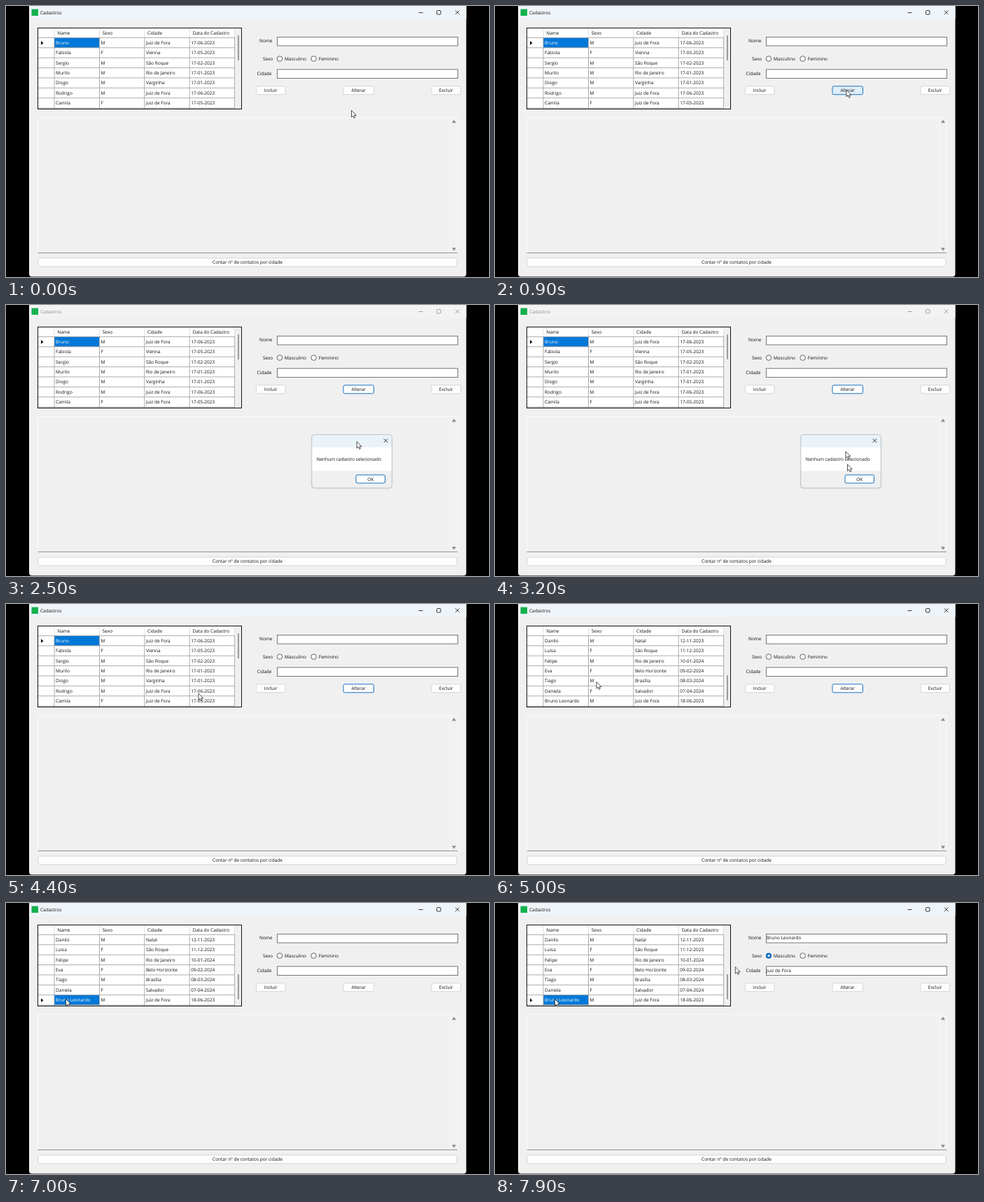
An HTML page that plays this animation: 690x388 px, repeating every 8000 ms.

```html
<!DOCTYPE html>
<html lang="pt">
<head>
<meta charset="utf-8">
<style>
html, body { margin: 0; width: 100%; height: 100%; overflow: hidden; background: #000; }
svg { display: block; width: 690px; height: 388px; }
text { font: 6.5px "Open Sans", "Noto Sans", sans-serif; fill: #111; text-rendering: geometricPrecision; white-space: pre; }
.mid { text-anchor: middle; }
.line { fill: none; stroke: #222; stroke-width: .9; }
.button { fill: #fdfdfd; stroke: #d2d2d2; stroke-width: .9; }
.focus { stroke: #0067c0; }
.hover { fill: #dfeef9; stroke: #0067c0; }
.field { fill: #fff; stroke: #777; }
.radio { fill: #f8f8f8; stroke: #555; stroke-width: .9; }
.on { fill: #fff; stroke: #0067c0; stroke-width: 2.4; }
.inactive text { fill: #8d8d8d; }
.inactive .line { stroke: #999; }
.inactive .bar { fill: #f3f3f3; }
.cursor { fill: #fff; stroke: #222; stroke-width: .8; stroke-linejoin: round; }
</style>
</head>
<body>
<svg id="stage" viewBox="0 0 690 388"></svg>
<script>
const rect = (x, y, w, h, attrs = '') => `<rect x="${x}" y="${y}" width="${w}" height="${h}" ${attrs}/>`;
const text = (x, y, s, attrs = '') => `<text x="${x}" y="${y}" ${attrs}>${s}</text>`;
const path = (d, attrs = 'class="line"') => `<path d="${d}" ${attrs}/>`;
const button = (id, x, y, w, h, label) =>
  rect(x, y, w, h, `id="${id}" rx="2" class="button"`) + text(x + w / 2, y + h / 2 + 2.4, label, 'class="mid"');
const cross = (x, y) => path(`M${x} ${y}l5.6 5.6m0-5.6l-5.6 5.6`);

const people = `Bruno,M,Juiz de Fora,17-06-2023
Fabiola,F,Vienna,17-05-2023
Sergio,M,São Roque,17-02-2023
Murilo,M,Rio de Janeiro,17-01-2023
Diogo,M,Varginha,17-01-2023
Rodrigo,M,Juiz de Fora,17-06-2023
Camila,F,Juiz de Fora,17-05-2023
Danilo,M,Natal,12-11-2023
Luisa,F,São Roque,11-12-2023
Felipe,M,Rio de Janeiro,10-01-2024
Eva,F,Belo Horizonte,09-02-2024
Tiago,M,Brasília,08-03-2024
Daniela,F,Salvador,07-04-2024
Bruno Leonardo,M,Juiz de Fora,18-06-2023`.split('\n').map(row => row.split(','));
const columns = [69, 133.5, 197.8, 262.2];
const top0 = 45.4, rowH = 14.38;

const titleBar = `<g id="title">
  ${rect(33, 0, 624.5, 18.5, 'fill="#eff4f9" class="bar"')}
  ${rect(36.5, 4.5, 9.5, 9.5, 'fill="#15b04e"')}
  ${text(49, 12, 'Cadastros')}
  ${path('M589.5 9.5h6')}${rect(615.5, 6.5, 5.5, 5.5, 'rx="1" class="line"')}${cross(642, 6.4)}
</g>`;

const grid = rect(45.5, 31.5, 291, 116, 'fill="#f0f0f0"') + rect(46, 32, 281, 115.5, 'fill="#fff"') +
  '<g id="rows"></g>' +
  path([...columns, 326.6].map(x => `M${x} 45V147.5`).join(''), 'stroke="#a3a3a3" stroke-width=".9"') +
  path([...columns, 326.6].map(x => `M${x} 32V45`).join(''), 'stroke="#ddd" stroke-width=".9"') +
  path([...Array(8).keys()].map(i => `M46 ${top0 + i * rowH}H327`).join(''), 'stroke="#a3a3a3" stroke-width=".9"') +
  ['Name', 'Sexo', 'Cidade', 'Data do Cadastro'].map((s, i) => text(columns[i] + 4.3, 41.2, s)).join('') +
  rect(331.3, 42, 1.4, 36, 'id="thumb" rx=".7" fill="#777"') +
  rect(45.5, 31.5, 291, 116, 'fill="none" stroke="#111"');

const form = text(362, 52.2, 'Nome') + rect(387.5, 44.5, 258, 12.5, 'class="field"') +
  text(367, 78, 'Sexo') + '<circle id="male" cx="391" cy="75.5" r="3.8" class="radio"/>' + text(398, 78, 'Masculino') +
  '<circle cx="439.6" cy="75.5" r="3.8" class="radio"/>' + text(446.8, 78, 'Feminino') +
  text(358.5, 98.8, 'Cidade') + rect(387.5, 90.8, 258, 12.7, 'class="field"') +
  `<g id="filled">${text(388, 52, people[13][0])}${text(388, 98.8, people[13][2])}</g>` +
  button('add', 357.5, 114.8, 41.5, 12, 'Incluir') +
  button('edit', 482, 114.8, 43.5, 12, 'Alterar') +
  button('del', 608, 114.8, 41.5, 12, 'Excluir');

const report = path('M45.5 353V159.7H645V353', 'fill="none" stroke="#fafafa"') +
  path('M635 160V353', 'stroke="#f8f8f8"') + path('M45.5 353.4H645', 'stroke="#909090"') +
  path('M637 167.3l3-4.3 3 4.3zM637 346.2l3 4.3 3-4.3z', 'fill="#8a8a8a"') +
  button('count', 46, 361, 598, 12, 'Contar nº de contatos por cidade');

const dialog = `<g id="dialog">
  ${rect(435.5, 185.5, 117, 78, 'rx="5" fill="#000" opacity=".06"')}
  ${rect(436.8, 185.6, 114.5, 76.4, 'rx="4" fill="#f0f0f0"')}
  ${path('M436.8 203.5V189.6q0-4 4-4h106.5q4 0 4 4v13.9z', 'fill="#eaf3f8"')}
  ${rect(436.8, 203.5, 114.5, 34, 'fill="#fff"')}
  ${rect(436.8, 185.6, 114.5, 76.4, 'rx="4" fill="none" stroke="#b0bcc3" stroke-width=".8"')}
  ${cross(539.7, 191.4)}
  ${text(443.5, 222.8, 'Nenhum cadastro selecionado')}
  ${button('ok', 500, 243.2, 41.5, 11.8, 'OK')}
</g>`;

const arrow = 'M0 0V9.6L2.2 7.6L3.7 10.8L5.3 10.1L3.9 7H6.8Z';

const stage = document.getElementById('stage');
stage.innerHTML = path('M33 0H657.5V383.5q0 4-4 4H37q-4 0-4-4z', 'fill="#f0f0f0"') +
  titleBar + grid + form + report + dialog + '<g id="trails"></g>' + path(arrow, 'id="cursor" class="cursor"');
const $ = id => document.getElementById(id);

// time, x, y of the pointer tip
const route = [
  [0, 493.5, 149.5], [100, 493.5, 149.5], [500, 502, 120.3], [2200, 502, 120.3],
  [2600, 501, 209.5], [3000, 501, 209.5], [3200, 503.5, 228], [3600, 517, 245],
  [4100, 517, 245], [4400, 275, 128], [4700, 145, 111.5], [5200, 145, 111.5],
  [5600, 113, 133.8], [5900, 97, 136.5], [6300, 97, 136.5], [6700, 85.5, 137.5],
  [7200, 85.5, 137.5], [7700, 343.3, 91.5], [8000, 343.3, 91.5]
];
// pointer images left behind: from, to, x, y
const trails = [
  [3100, 3400, 501, 209.5], [5200, 6300, 145, 111.5],
  [5700, 6400, 113, 133.8], [7200, 8000, 85.5, 137.5]
];

function pointerAt(t) {
  const i = route.findIndex(p => p[0] > t);
  const [a, ax, ay] = route[i - 1], [b, bx, by] = route[i];
  const u = (t - a) / (b - a), k = u * u * (3 - 2 * u);
  return [ax + (bx - ax) * k, ay + (by - ay) * k];
}

function drawRows(first, selected) {
  let out = '';
  for (let i = 0; i < 7; i++) {
    const y = top0 + i * rowH, active = first + i === selected;
    if (active) out += rect(69, y, 64.5, rowH, 'fill="#0078d7"') +
      path(`M50 ${y + 4.7}l3.5 2.8-3.5 2.8z`, 'fill="#111"');
    people[first + i].forEach((s, c) => {
      out += text(columns[c] + 2.1, y + 9.5, s, active && !c ? 'style="fill:#fff"' : '');
    });
  }
  $('rows').innerHTML = out;
}

function render(t) {
  const modal = t >= 2200 && t < 4100;
  const first = t < 4600 ? 0 : t < 4700 ? 3 : t < 4800 ? 6 : 7;
  const filled = t >= 7300;
  drawRows(first, t < 5900 ? 0 : 13);
  $('thumb').setAttribute('y', 42 + first * 60 / 7);
  $('title').setAttribute('class', modal ? 'inactive' : '');
  $('dialog').style.display = modal ? '' : 'none';
  $('edit').setAttribute('class', 'button ' + (t < 400 || t >= 5900 ? '' : t < 2200 ? 'hover' : 'focus'));
  $('ok').setAttribute('class', 'button ' + (t < 3700 ? 'focus' : 'hover'));
  $('filled').style.display = filled ? '' : 'none';
  $('male').setAttribute('class', filled ? 'on' : 'radio');
  $('male').setAttribute('r', filled ? 2.9 : 3.8);
  $('trails').innerHTML = trails.filter(([a, b]) => t >= a && t < b)
    .map(([, , x, y]) => path(arrow, `class="cursor" transform="translate(${x} ${y})"`)).join('');
  $('cursor').setAttribute('transform', `translate(${pointerAt(t)})`);
}

const start = performance.now();
let shown = -1;
function tick(now) {
  const t = Math.floor(Math.max(0, now - start) % 8000 / 100) * 100;
  if (t !== shown) render(shown = t);
  requestAnimationFrame(tick);
}
tick(start);
</script>
</body>
</html>
```
